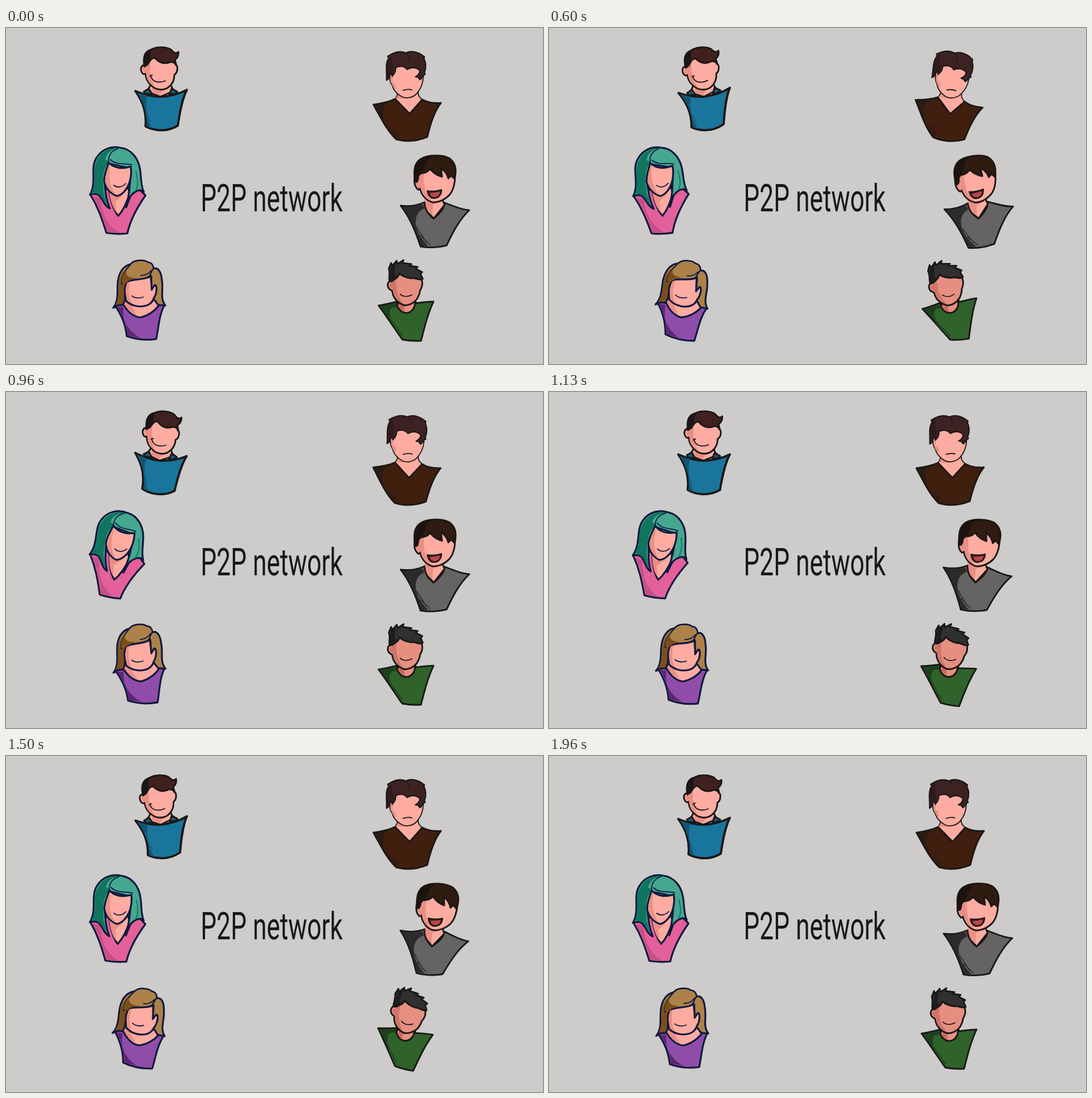
Animation of 947x592 px, one loop 2000 ms. Source, as an HTML page:

```html
<!DOCTYPE html>
<html lang="en">
<head>
<meta charset="utf-8">
<title>P2P network</title>
<style>
html, body { margin: 0; width: 100%; height: 100%; overflow: hidden; background: #cdccca; }
svg { display: block; width: 947px; height: 592px; }
path { stroke-linejoin: round; stroke-linecap: round; }
.warm { stroke: #1a1716; stroke-width: 2.9; }
.navy { stroke: #10193f; stroke-width: 3.2; }
.flat { stroke: none; }
.line { fill: none; }
.thin { stroke-width: 1.8; }
.skin { fill: #feaca1; }
.shade { fill: #e98f84; stroke: none; }
text { font: 67.5px Roboto, sans-serif; fill: #16191a; }
</style>
</head>
<body>
<svg viewBox="0 0 947 592">
  <text transform="translate(343.3 323) scale(.657 1)">P2P network</text>

  <g id="blue" class="warm">
    <path class="skin" d="M255 92C256 101 253 107 246 111L272 121L298 110C291 107 290 100 291 92Z"/>
    <path class="shade" d="M256 100L258 114L270 118L279 109L267 108Z"/>
    <path fill="#155a7c" d="M252 107L243 112L246 116L258 117Z"/>
    <path fill="#155a7c" d="M292 107L302 112L298 116L288 117Z"/>
    <path class="skin" d="M245 66C238 64 236 73 240 79C242 82 245 82 246 80C246 89 251 97 257 102C265 110 280 111 288 103C294 98 297 91 297 82C303 79 304 66 299 65L297 50L270 40L248 50Z"/>
    <path class="shade" d="M246 69C241 65 239 73 243 78L247 80C247 89 252 97 259 102L265 106C257 97 253 85 254 62Z"/>
    <path fill="#40211f" d="M244 68C241 51 245 41 256 38C266 32 283 33 291 38C296 44 300 46 304 42C305 50 301 54 298 56L300 64C296 60 291 59 287 61C277 64 269 60 263 53C256 52 254 58 250 64Z"/>
    <path class="flat" fill="#1b1617" d="M244 67C241 51 245 41 258 38C251 46 259 50 250 64Z"/>
    <path class="line thin" d="M255 83C256 89 260 94 267 95Q274 96 281 93M254 85L258 83"/>
    <path fill="#1a759d" stroke-width="3.8" d="M228 111C240 116 257 121 273 121C289 120 306 116 319 109C311 124 307 145 303 172C293 178 283 181 270 180Q256 179 246 173C248 151 243 132 228 111Z"/>
    <path class="flat" fill="#135575" d="M231 114L249 119C245 134 247 157 257 177L248 173C249 148 242 130 231 114Z"/>
    <path class="line" stroke="#135575" stroke-width="1" d="M248 150L255 165"/>
  </g>

  <g id="brown" class="warm">
    <path class="skin thin" d="M690 110C691 117 689 122 686 125L712 151L734 126C728 121 726 118 727 108Z"/>
    <path class="shade" d="M681 97C680 107 686 113 691 117L690 124L700 125L709 123C695 120 688 113 684 101Z"/>
    <path class="skin thin" d="M677 80C676 90 677 97 681 101C683 109 689 116 698 121C706 125 717 123 724 116C732 107 736 96 736 84L728 62L690 60Z"/>
    <path class="shade" d="M679 84C676 95 681 103 688 108L686 98L681 94L684 76Z"/>
    <path fill="#3d2223" stroke-width="2.2" d="M671 92C672 78 668 63 675 53L673 50C682 44 694 39 705 44C717 38 730 45 734 48L738 51L737 54C741 61 741 71 738 78L739 82C736 81 735 88 730 91L727 87L722 86C728 83 731 78 729 74C723 69 716 68 707 73C703 67 694 66 687 70C688 77 684 82 681 85L680 79C675 83 678 90 671 92Z"/>
    <path class="flat" fill="#2f1b1c" d="M671 91C672 78 669 63 675 53L682 49C677 62 686 65 682 79L679 77Z"/>
    <path class="line" stroke-width="1.2" d="M705 44Q710 46 711 56"/>
    <path class="line thin" d="M700 110Q709 107 716 109"/>
    <path fill="#401f0e" d="M648 135C661 133 676 130 686 125C695 133 703 143 712 151L734 126C742 131 754 133 767 132C755 147 748 170 743 192C724 200 706 201 688 196C671 180 660 156 648 135Z"/>
    <path class="flat" fill="#2a1b15" d="M650 136L675 131C655 140 666 178 693 196L688 195C672 179 661 157 650 136Z"/>
    <path class="line thin" stroke="#2a1b15" d="M676 177L688 191M681 176L691 190"/>
  </g>

  <g id="pink" class="navy">
    <path fill="#e4609a" d="M149 294C162 315 169 335 177 361Q195 364 214 362C219 338 232 315 246 295L236 285L165 284Z"/>
    <path class="flat" fill="#c64f87" d="M153 297L166 298C169 325 175 346 201 361L179 360C173 336 166 317 153 297Z"/>
    <path class="skin" d="M181 280C184 300 188 320 198 331C206 322 213 309 218 291L212 270Z"/>
    <path class="shade" d="M181 284L197 297L208 293L193 306L195 325C187 316 184 302 181 284Z"/>
    <path fill="#45a78f" d="M148 294C161 270 147 247 160 228C168 215 184 207 202 211C221 213 233 230 236 247C239 262 237 276 243 289C237 282 226 288 219 297L212 316C217 295 220 270 219 247L181 239L174 275C176 293 177 304 183 318C172 313 171 300 163 294Q156 291 148 294Z"/>
    <path class="flat" fill="#10745f" d="M151 290C162 269 149 248 163 229C170 217 186 209 202 212C185 216 180 228 181 239C169 248 171 270 172 289L178 312C171 306 171 296 162 292Z"/>
    <path class="flat" fill="#45a78f" d="M175 232C177 219 188 212 202 212L191 217C185 220 183 228 183 235Z"/>
    <path class="skin" d="M181 237C179 247 173 255 173 270C176 284 186 293 196 296C205 294 213 285 217 274C222 261 221 251 220 244C205 249 190 247 181 237Z"/>
    <path class="shade" d="M182 243C180 251 175 257 175 269C177 281 185 290 194 294C183 280 180 260 184 245Z"/>
    <path class="line thin" d="M190 277C196 282 205 281 211 274M184 232C196 243 209 237 222 241M181 236C180 222 188 216 198 212"/>
    <path class="line thin" stroke="#10745f" d="M229 253Q235 275 229 285"/>
  </g>

  <g id="grey" class="warm">
    <path class="skin" d="M740 294C742 305 740 310 738 314L754 336L774 311C769 307 771 300 771 292Z"/>
    <path class="shade" d="M738 300L740 320L752 331L753 312L767 306L751 307Z"/>
    <path class="skin" d="M726 255C718 260 718 278 727 285C731 284 731 281 730 282C732 294 741 304 752 307C764 308 776 301 783 293C790 284 792 273 792 259L768 240L737 241Z"/>
    <path class="shade" d="M727 260C720 265 721 278 728 283L731 281C733 292 740 302 751 305C740 294 735 277 737 253Z"/>
    <path fill="#2f1b10" d="M721 271C719 253 719 239 731 231C744 223 768 223 781 229C793 237 795 251 791 266L785 260L780 265C778 256 773 251 767 247L769 262C760 260 752 254 748 248C743 255 737 256 731 256L727 261C727 269 725 273 721 271Z"/>
    <path class="flat" fill="#1d130e" d="M722 270C719 252 721 239 731 232C739 227 746 225 754 225C735 232 743 247 731 256Z"/>
    <path fill="#3d1a1a" stroke-width="2.2" d="M743 287Q756 289 768 285C768 294 763 300 754 300C748 300 744 294 743 287Z"/>
    <path class="flat" fill="#b94849" d="M747 291Q757 290 765 288C765 295 761 298 754 298Q749 297 747 291Z"/>
    <path fill="#656462" d="M696 313C711 315 727 312 738 307C739 322 745 328 754 336C762 329 772 321 774 308C788 313 801 320 817 321C799 338 788 360 777 383Q754 389 731 385C723 360 713 334 696 313Z"/>
    <path class="flat" fill="#2b2b2a" d="M699 315C712 315 723 313 735 311L738 318C715 326 718 360 745 384L732 384C724 359 714 334 699 315Z"/>
    <path class="line" stroke="#2b2b2a" stroke-width="1.5" d="M724 351L741 377M731 366L748 382"/>
  </g>

  <g id="purple" class="navy">
    <path fill="#ad8149" d="M189 493C202 477 193 455 199 438C203 424 212 418 220 416C228 407 246 409 250 413C257 413 260 419 260 424C269 421 274 431 275 445C278 461 271 476 281 489L266 488L247 455L210 454L209 487Q198 488 189 493Z"/>
    <path class="flat" fill="#7b4f1c" d="M191 491C202 477 196 455 201 440L208 427C207 437 211 443 222 442C209 447 207 457 208 476L207 486Z"/>
    <path class="skin" d="M211 476L206 489C213 500 225 508 237 511C251 507 263 498 270 490L260 477Z"/>
    <path class="shade" d="M211 481L208 489Q220 502 231 506L221 490L238 492L218 484Z"/>
    <path class="skin" d="M213 447C207 459 210 472 212 481C220 489 233 492 243 490C252 489 259 483 261 475C265 470 268 453 262 453L257 461L256 437C243 445 229 441 213 447Z"/>
    <path class="shade" d="M214 449C209 460 212 473 214 480L223 486C215 473 216 460 218 448Z"/>
    <path fill="#ad8149" stroke-width="2.2" d="M204 451C204 434 212 425 220 416C228 407 246 409 250 413C257 413 260 419 260 424C254 430 257 438 247 440C234 444 222 441 213 448Z"/>
    <path class="flat" fill="#7b4f1c" d="M204 449C204 438 208 430 213 426C208 437 219 441 231 440C220 442 213 446 209 453Z"/>
    <path class="line thin" d="M260 424C251 434 256 446 257 462C262 453 262 451 265 453M256 427C252 433 245 436 238 436M222 472C228 477 237 476 242 474"/>
    <path fill="#8f4da9" d="M193 490C200 487 206 488 208 489C215 500 225 509 237 510C251 507 263 498 270 488L279 489C270 506 269 528 265 548Q238 552 213 543C211 523 204 506 193 490Z"/>
    <path class="flat" fill="#5b2671" d="M196 491L207 492C205 513 212 532 237 546L215 542C213 522 206 505 196 491Z"/>
  </g>

  <g id="green" class="warm">
    <path fill="#e68f81" d="M692 476C694 484 692 488 687 488C691 499 700 504 709 502C716 500 721 492 723 485L720 474Z"/>
    <path class="shade" style="fill:#c8685f" d="M693 483L693 495L703 500L702 491L718 486L704 488Z"/>
    <path fill="#e68f81" d="M680 446C671 445 671 458 679 462L681 463C682 475 690 484 701 488C709 490 719 485 725 477C729 470 730 466 730 463C735 455 735 447 732 441L718 429L686 430Z"/>
    <path class="shade" style="fill:#cf746a" d="M680 449C674 449 675 458 682 460C682 472 690 482 701 486C692 476 687 462 688 439Z"/>
    <path fill="#303031" d="M676 446C675 436 678 432 675 424L679 414L681 419L689 410L690 416L701 409L699 414L715 416L711 419L726 421L722 424L734 430L731 433L735 442C728 446 722 439 715 441C706 440 699 438 694 432C692 440 687 441 681 446Z"/>
    <path class="flat" fill="#1d1d1e" d="M677 445L679 420L687 416L685 436L690 436L681 445Z"/>
    <path class="line thin" d="M695 469C701 474 709 474 716 470"/>
    <path fill="#2f632b" d="M657 489C671 487 682 484 690 482C688 493 697 503 708 502C717 500 721 493 721 485C732 484 743 482 754 482C744 503 738 527 732 551Q715 552 699 549C684 528 672 509 657 489Z"/>
    <path class="flat" fill="#1d401d" d="M660 490L687 485L689 492C668 487 674 524 703 549L699 547C685 528 673 509 660 490Z"/>
    <path class="line thin" stroke="#1d401d" d="M678 513L699 542"/>
  </g>
</svg>
<script>
const LOOP = 2000, STEPS = 60;
const knots = [0, 8, 18, 29, 38, 51, 59];
// Pivot x, y and the tilt in degrees at each knot
const people = {
  blue:   [273, 107, [0, -4.3, -4.5, 5, -2.3, -3.2, 0]],
  brown:  [707, 120, [0, 5.5, 8, 2, .3, 0, 0]],
  pink:   [196, 287, [0, -3.3, -3, 9.3, 3.8, 0, 0]],
  grey:   [757, 305, [0, -5, -6.2, 0, 5.5, 3.8, 0]],
  purple: [236, 480, [0, 5.5, 7.2, -2, 5.6, 4.6, 0]],
  green:  [706, 480, [0, -4.5, -7, .2, 11, 8.3, 0]]
};

const n = knots.length;
const knotAt = i => knots[(i + n) % n] + STEPS * Math.floor(i / n);
const valueAt = (v, i) => v[(i + n) % n];
const slope = (v, i) => (valueAt(v, i + 1) - valueAt(v, i - 1)) / (knotAt(i + 1) - knotAt(i - 1));

// Periodic Hermite curve through the knots
function tilt(v, step) {
  let i = n - 1;
  while (knots[i] > step) i--;
  const span = knotAt(i + 1) - knots[i];
  const u = (step - knots[i]) / span, w = 1 - u;
  return v[i] * w * w * (1 + 2 * u) + valueAt(v, i + 1) * u * u * (3 - 2 * u)
    + span * u * w * (slope(v, i) * w - slope(v, i + 1) * u);
}

const start = performance.now();
function draw(now) {
  const time = Math.max(0, now - start) % LOOP;
  const step = Math.floor(time * STEPS / LOOP + .22) % STEPS;
  for (const [id, [x, y, v]] of Object.entries(people)) {
    document.getElementById(id).setAttribute("transform", `rotate(${tilt(v, step)} ${x} ${y})`);
  }
  requestAnimationFrame(draw);
}
draw(start);
</script>
</body>
</html>
```
